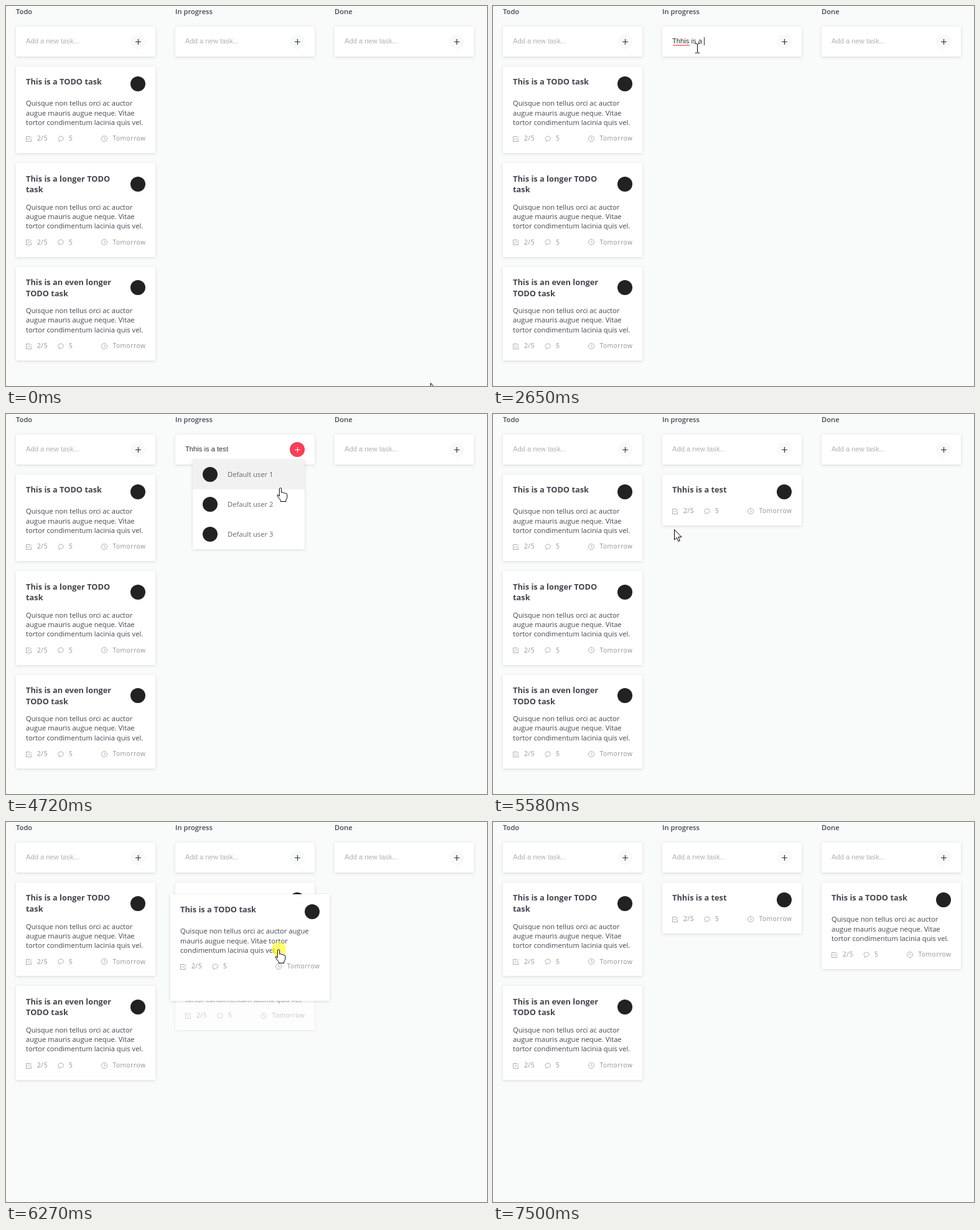
An HTML page for the animation above (7970 ms loop, 773 by 610 pixels).

```html
<!DOCTYPE html>
<html lang="en">
<head>
<meta charset="utf-8">
<title>Task board</title>
<style>
  html, body { margin: 0; width: 100%; height: 100%; overflow: hidden; background: #f9fbfa; }
  body { position: relative; font: 11.2px/15.25px "Open Sans", sans-serif; color: #44444f; }
  .col { position: absolute; top: 1px; width: 224px; }
  h2 { margin: 0 0 16px; font-size: 11.2px; line-height: 16px; font-weight: 600; }
  .box, .card, .menu { background: #fff; box-shadow: 0 1px 5px rgba(0, 0, 0, .13); }
  .box { display: flex; align-items: center; height: 48px; padding: 0 16px; box-sizing: border-box;
         font-family: "Liberation Sans", Arial, sans-serif; position: relative; }
  .field { flex: 1; white-space: pre; color: #333; }
  .field.empty { color: #b0b0b0; }
  .caret { position: absolute; top: 17px; width: 1px; height: 13px; background: #333; }
  .wave { position: absolute; left: 17px; top: 28px; width: 27px; height: 4px; }
  .add { width: 24px; height: 24px; border-radius: 50%; background: #f8f9f9; color: #333; }
  .add.on { background: #fa3e57; color: #fff; }
  .card { width: 192px; padding: 16px; margin-top: 16px; }
  .top { display: flex; align-items: center; min-height: 24px; margin-bottom: 11.4px; }
  h3 { position: relative; top: .4px; flex: 1; align-self: flex-start; margin: 0 16px 0 0;
       font-size: 12.8px; line-height: 17.6px; }
  p { margin: 0 0 11.8px; }
  .avatar { width: 24px; height: 24px; border-radius: 50%; background: #222; }
  .meta { display: flex; align-items: center; height: 14.25px; font-size: 10.2px; letter-spacing: .55px; color: #92929a; }
  .meta svg { width: 10px; height: 10px; margin-right: 8px; fill: none; stroke: #9a9aa2; stroke-width: .8; }
  .meta span { margin-right: 16px; }
  .meta span:last-child { margin: 0 -.5px 0 0; }
  .meta svg:nth-of-type(3) { margin-left: auto; }
  .drag { position: absolute; left: 0; top: 0; width: 224px; height: 139px; margin: 0; }
  .menu { position: absolute; left: 300px; top: 73px; width: 180px; }
  .row { display: flex; align-items: center; height: 48px; padding-left: 16px; color: #6f6468; }
  .row .avatar { margin-right: 16px; }
  .row.on { background: #f1f1f1; }
  #pointer { position: absolute; left: 0; top: 0; overflow: visible; pointer-events: none; }
  [hidden] { display: none !important; }
</style>
</head>
<body>
<svg id="pointer" width="1" height="1" stroke="#000" stroke-linejoin="round">
  <circle id="press" r="11.5" fill="#fbfb00" fill-opacity=".56" stroke="none"/>
  <path id="shape"/>
</svg>
<script>
const LOOP = 7970, TICK = 77;
const FOCUS = 680, TYPE = 1390, TYPE_END = 3340, OPEN = 4330, PICK = 5120, GRAB = 5960, RELEASE = 6880, SETTLE = 6960;
const HINT = 'Add a new task...', TYPED = 'Thhis is a test';
const LOREM = 'Quisque non tellus orci ac auctor augue mauris augue neque. Vitae tortor condimentum lacinia quis vel.';

// Pointer legs: each runs from the last stop to (x, y), bowed sideways by (bx, by) halfway
const START = { x: 682, y: 605 };
const LEGS = [
  { from: 70, to: FOCUS, x: 338, y: 53, bx: 0, by: 0 },
  { from: 850, to: 930, x: 328, y: 68, bx: 0, by: 0 },
  { from: 3640, to: 4410, x: 467, y: 58, bx: 60, by: -20 },
  { from: 4490, to: 4950, x: 434, y: 110, bx: -6, by: 30 },
  { from: PICK, to: 5890, x: 174, y: 185, bx: 48, by: 28 },
  { from: GRAB, to: 6650, x: 634, y: 197, bx: 34, by: 13 },
  { from: 7110, to: 7500, x: 756, y: 612, bx: 0, by: 0 }
];
const HOLD = { x: 158, y: 88 }, LAG = .23;

const SHAPES = {
  arrow: 'M.5.5V17L4.3 13.6 6.8 19.5 9.3 18.4 6.8 12.6H12Z',
  hand: 'M-1.7 14V1.7Q0-.8 1.7 1.7V8.2Q3.4 6.6 4.8 8.8 6.5 7.6 7.8 9.7 10.5 8.8 10.8 11.5V15.5Q10.6 18 8.8 20V22.5H.3V20.5Q-2.6 17-5 13.2-4.6 9.6-1.7 14Z',
  beam: 'M-3-7.5H-1L.5-6.5 2-7.5H4M.5-6.5V6.5M-3 7.5H-1L.5 6.5 2 7.5H4'
};

const $ = (sel, root = document) => root.querySelector(sel);
const make = html => {
  const holder = document.createElement('template');
  holder.innerHTML = html.trim();
  return holder.content.firstChild;
};
const icon = d => `<svg viewBox="0 0 10 10"><path d="${d}"/></svg>`;
const CHECK = icon('M8.5 5.5V9.5H.5V1.5H7M2.5 4.5 4.5 6.5 9.5 1.5');
const CHAT = icon('M2.2 9.4V7.2A4.2 3.6 0 1 1 4.4 8.2Z');
const CLOCK = icon('M.5 5a4.5 4.5 0 1 1 9 0a4.5 4.5 0 1 1-9 0M5 2.3V5L7 6.3');

const card = (title, text) => make(`<div class="card">
  <div class="top"><h3>${title}</h3><div class="avatar"></div></div>${text ? `<p>${text}</p>` : ''}
  <div class="meta">${CHECK}<span>2/5</span>${CHAT}<span>5</span>${CLOCK}<span>Tomorrow</span></div></div>`);

const column = (name, i) => make(`<div class="col" style="left:${16 + 256 * i}px"><h2>${name}</h2>
  <div class="box"><div class="field empty">${HINT}</div>
  <svg class="add" viewBox="0 0 24 24"><path d="M8 12.5H17M12.5 8V17" stroke="currentColor" stroke-width="1.2"/></svg></div>
  <div class="list"></div></div>`);

const cols = ['Todo', 'In progress', 'Done'].map(column);
const lists = cols.map(c => $('.list', c));
const moved = card('This is a TODO task', LOREM);
const fresh = card(TYPED);
const drag = moved.cloneNode(true);
drag.classList.add('drag');
lists[0].append(card('This is a longer TODO task', LOREM), card('This is an even longer TODO task', LOREM));
lists[1].append(fresh);

const menu = make('<div class="menu">' + [1, 2, 3].map(n =>
  `<div class="row"><div class="avatar"></div>Default user ${n}</div>`).join('') + '</div>');
const pointer = $('#pointer'), shape = $('#shape'), press = $('#press');
pointer.before(...cols, menu, drag);

const box = $('.box', cols[1]), field = $('.field', box), add = $('.add', box);
const caret = make('<div class="caret"></div>');
const wave = make(`<svg class="wave" fill="none" stroke="#e33"><path d="M0 3${'l1.5-2 1.5 2'.repeat(9)}"/></svg>`);
box.append(caret, wave);
const pen = document.createElement('canvas').getContext('2d');
pen.font = '11.2px "Liberation Sans", Arial, sans-serif';

const within = (t, a, b) => t >= a && t < b;
const clamp = (v, lo, hi) => Math.max(lo, Math.min(hi, v));
const place = (el, x, y) => el.style.transform = `translate(${Math.round(x)}px,${Math.round(y)}px)`;

// The pointer is sampled once per TICK; lag is counted in ticks
function pointerAt(t, lag = 0) {
  const i = LEGS.findLastIndex(leg => t >= leg.from);
  if (i < 0) return START;
  const a = LEGS[i - 1] || START, b = LEGS[i];
  const gaps = Math.round((b.to - b.from) / TICK);
  const step = Math.floor((t - b.from) / (b.to - b.from) * gaps + .1) + 1;
  const u = clamp((Math.min(step, gaps + 1) - lag) / (gaps + 1), 0, 1);
  const f = u * u * (3 - 2 * u), bow = Math.sin(Math.PI * f);
  return { x: a.x + (b.x - a.x) * f + b.bx * bow, y: a.y + (b.y - a.y) * f + b.by * bow };
}

function typedAt(t) {
  if (t < TYPE || t >= PICK) return '';
  const u = (t - TYPE) / (TYPE_END - TYPE);
  return TYPED.slice(0, Math.ceil(1 + u * (TYPED.length - 1)));
}

function render(t) {
  const { x, y } = pointerAt(t);

  const typed = typedAt(t);
  field.textContent = typed || HINT;
  field.classList.toggle('empty', !typed);
  caret.hidden = !within(t, FOCUS, OPEN);
  caret.style.left = Math.round(16 + pen.measureText(typed).width) + 'px';
  wave.style.display = typed.length > 5 && t < OPEN ? '' : 'none';
  menu.hidden = !within(t, OPEN, PICK);
  fresh.hidden = t < PICK;

  const target = t < GRAB ? 0 : Math.min(2, Math.floor(x / 256));
  if (moved.parentNode !== lists[target]) lists[target][target ? 'append' : 'prepend'](moved);
  moved.style.opacity = within(t, GRAB, SETTLE) ? .5 : 1;
  drag.hidden = !within(t, GRAB, RELEASE);
  const held = pointerAt(t, LAG);
  place(drag, held.x - HOLD.x, held.y - HOLD.y);

  const under = document.elementFromPoint(x, y);
  const over = sel => under && under.closest(sel);
  for (const row of menu.children) row.classList.toggle('on', row === over('.row'));
  add.classList.toggle('on', !menu.hidden || over('.add') === add);

  const kind = over('.card, .add, .menu') ? 'hand' : over('.box') ? 'beam' : 'arrow';
  shape.setAttribute('d', SHAPES[kind]);
  shape.setAttribute('fill', kind === 'beam' ? 'none' : '#fff');
  press.style.display = drag.hidden ? 'none' : '';
  place(pointer, x, y);
}

const begin = performance.now();
(function tick() {
  render((performance.now() - begin) % LOOP);
  requestAnimationFrame(tick);
})();
</script>
</body>
</html>
```
